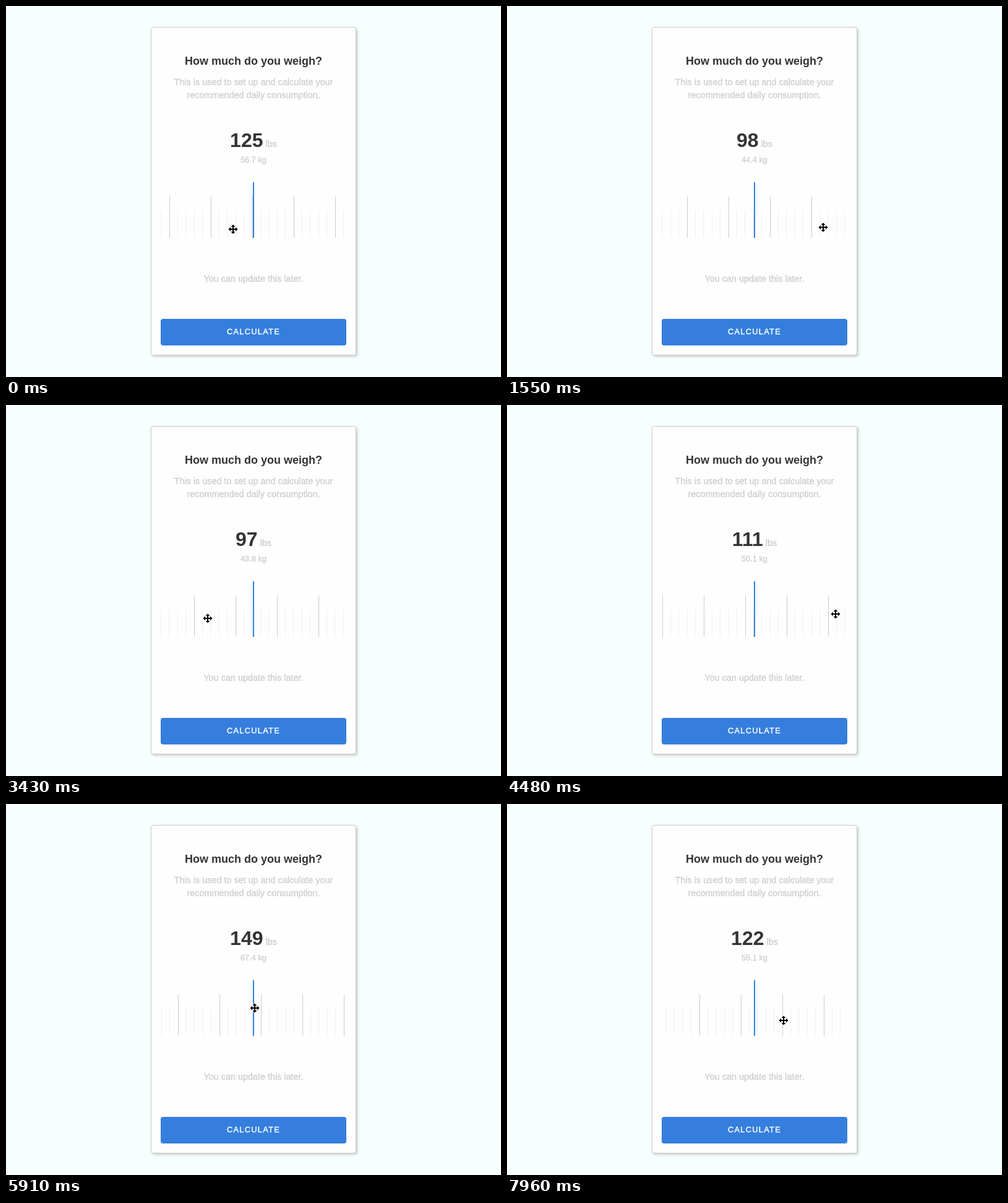
These frames come from a looping animation (800 px wide and 600 px high, 8 s). An HTML page:

```html
<!DOCTYPE html>
<html lang="en">
<head>
<meta charset="utf-8">
<title>Weight picker</title>
<style>
  html, body { margin: 0; width: 100%; height: 100%; overflow: hidden; background: #f6fffe; }
  .card {
    position: absolute; left: 234px; top: 34px; width: 332px; height: 531px;
    box-sizing: border-box; border: 1px solid #ccc; border-radius: 4px;
    background: #fefefe; box-shadow: 2px 2px 4px rgba(0, 0, 0, .2);
  }
  svg { position: absolute; left: 0; top: 0; }
  text {
    font: 14.4px "Liberation Sans", Arial, sans-serif;
    text-anchor: middle; white-space: pre;
    fill: #ccc; stroke: #ccc; stroke-width: .3px;
  }
  .title, .lbs { font-weight: 700; fill: #333; stroke: none; }
  .title { font-size: 18px; }
  .lbs { font-size: 32px; }
  .unit { font-size: 14.4px; font-weight: 400; fill: #ccc; stroke: #ccc; }
  .kg { font-size: 12.8px; }
  .label { font-size: 12.8px; letter-spacing: .1em; fill: #fff; stroke: #fff; stroke-width: .45px; }
  .major { stroke: #ccc; }
  .minor { stroke: #eee; }
</style>
</head>
<body>
<div class="card"></div>
<svg width="800" height="600" viewBox="0 0 800 600">
  <text class="title" x="400" y="95">How much do you weigh?</text>
  <text x="400" y="128">This is used to set up and calculate your</text>
  <text x="400" y="149">recommended daily consumption.</text>
  <text class="lbs" x="400" y="228"><tspan id="lbs">125</tspan><tspan class="unit"> lbs</tspan></text>
  <text class="kg" id="kg" x="400" y="253">56.7 kg</text>
  <path class="minor" id="minor"/>
  <path class="major" id="major"/>
  <rect x="399" y="285" width="2" height="90" fill="#357edd"/>
  <text x="400" y="446">You can update this later.</text>
  <rect x="250" y="506" width="300" height="43" rx="4" fill="#357edd"/>
  <text class="label" x="400" y="531">CALCULATE</text>
  <path id="cursor" stroke="#fff" stroke-width="1.6" paint-order="stroke" stroke-linejoin="round"
    d="M0-7.5 3.5-4H1V-1H4V-3.5L7.5 0 4 3.5V1H1V4H3.5L0 7.5-3.5 4H-1V1H-4V3.5L-7.5 0-4-3.5V-1H-1V-4H-3.5Z"/>
</svg>
<script>
const LOOP = 8000, GLIDE = 210, DRAG = 270, SETTLE = 40;
const GAP = 13.4, KG = 0.4536;
const START = { x: 367, y: 361, value: 125 };

// Each swipe: glide start, press, x pressed, x released, y
const swipes = [
  [240, 570, 330, 448, 360],
  [1020, 1230, 266, 511, 358],
  [1740, 2090, 271, 483, 353],
  [2570, 3010, 521, 326, 345],
  [3520, 3780, 519, 333, 352],
  [4240, 4690, 531, 272, 338],
  [5110, 5430, 489, 238, 342],
  [5700, 5960, 402, 255, 330],
  [6230, 6290, 300, 540, 352],
  [6560, 6674, 257, 351, 362],
  [7400, 7690, 272, 447, 350]
];

const $ = id => document.getElementById(id);
const mix = (a, b, p) => a + (b - a) * p;
const progress = (t, from, length) => Math.max(0, Math.min(1, (t - from) / length));

function stateAt(t) {
  let { x, y, value } = START, held = false;
  for (const [glide, press, x0, x1, toY] of swipes) {
    if (t < glide) break;
    const free = progress(t, glide, Math.min(GLIDE, press - glide));
    const drag = progress(t, press, DRAG);
    x = mix(mix(x, x0, free), x1, drag);
    y = mix(y, toY, free);
    value -= (x1 - x0) * drag / GAP;
    held = t >= press && t < press + DRAG + SETTLE;
  }
  return { x, y, value, held };
}

// A held ruler follows the pointer, a released one settles on a whole pound
function drawRuler(value, held) {
  const base = held
    ? Math.round(398.9 - value % 5 * 13.25)
    : Math.round(397.9 - Math.round(value) % 5 * 13.25);
  let major = "", minor = "";
  for (let i = -15; i <= 20; i++) {
    const x = Math.floor(base + i * GAP + 1e-6);
    if (x < 250 || x >= 550) continue;
    if (i % 5) minor += `M${x + 0.5} 331V374`;
    else major += `M${x + 0.5} 308V375`;
  }
  $("major").setAttribute("d", major);
  $("minor").setAttribute("d", minor);
}

function render(t) {
  const { x, y, value, held } = stateAt(t);
  drawRuler(value, held);
  $("lbs").textContent = Math.round(value);
  $("kg").textContent = (value * KG).toFixed(1) + " kg";
  $("cursor").setAttribute("transform", `translate(${Math.round(x)} ${Math.round(y)})`);
}

const begin = performance.now();
function tick() {
  render((performance.now() - begin) % LOOP);
  requestAnimationFrame(tick);
}
tick();
</script>
</body>
</html>
```
